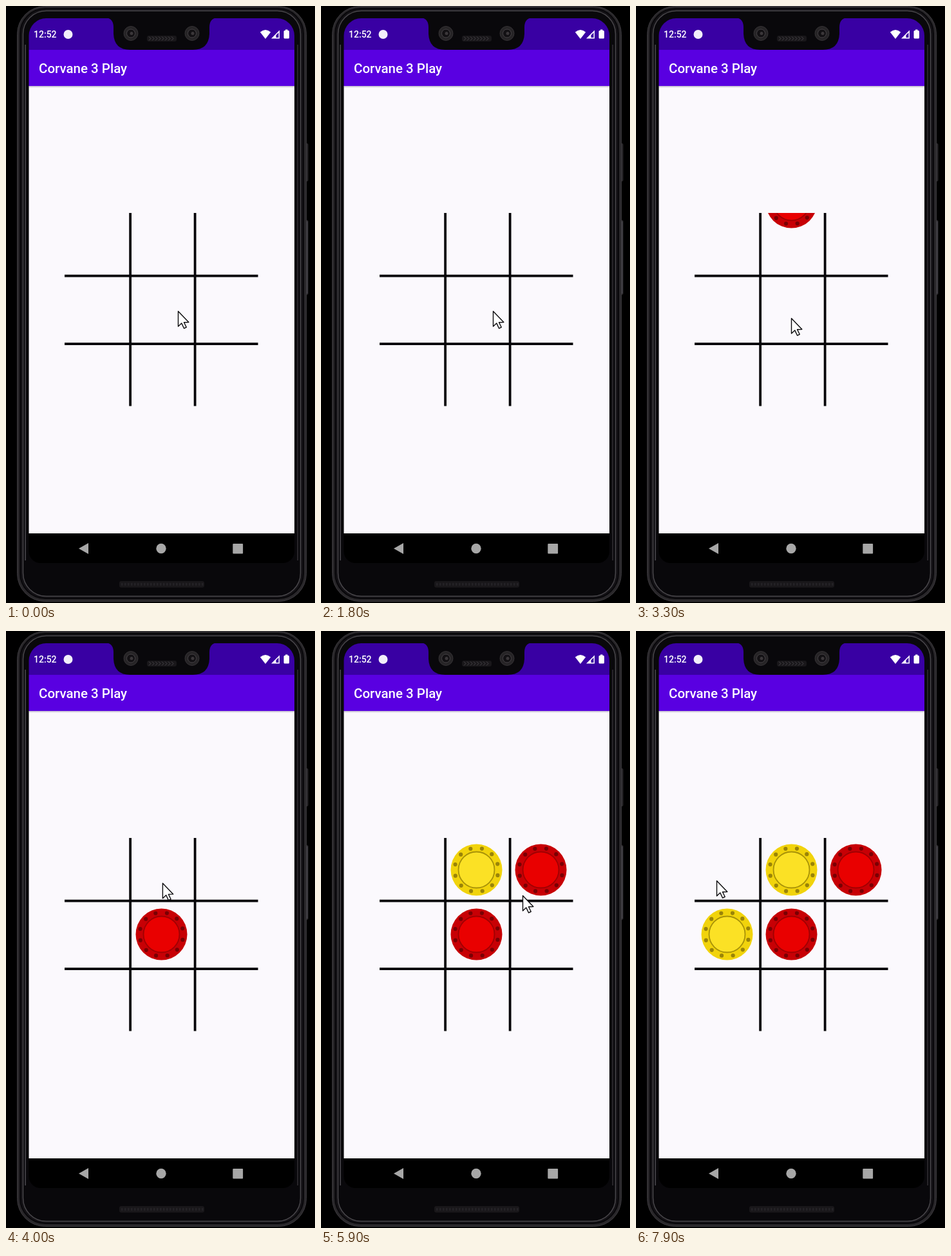
Animation, 480 px wide and 926 px high, one loop 8000 ms. Source, as an HTML page with a canvas:

```html
<!DOCTYPE html>
<html lang="en">
<head>
<meta charset="utf-8">
<title>Three in a row</title>
<style>
html, body { margin: 0; width: 100%; height: 100%; overflow: hidden; background: #000; }
canvas { display: block; width: 480px; height: 926px; }
</style>
</head>
<body>
<canvas id="stage" width="480" height="926"></canvas>
<script>
const ctx = document.getElementById('stage').getContext('2d');
const LOOP = 8000;
const FALL_MS = 300;
const FALL_PX = 430;

const RED = { rim: '#c70005', face: '#e90000', ring: '#a00002', dot: '#7a0003' };
const YELLOW = { rim: '#f1d30c', face: '#fbe125', ring: '#a89208', dot: '#9a8408' };

// Each chip: cell centre, colours, moment of the tap
const chips = [
  { x: 241.5, y: 470.5, skin: RED, at: 3129 },
  { x: 241.5, y: 370.5, skin: YELLOW, at: 4130 },
  { x: 341.5, y: 370.5, skin: RED, at: 5450 },
  { x: 141.5, y: 470.5, skin: YELLOW, at: 6829 }
];

// Pointer stops: time, x, y
const path = [
  [0, 267, 473], [1900, 267, 473], [2600, 243, 488], [3100, 241, 484],
  [3700, 241, 484], [4050, 243, 386], [4300, 245, 384], [4700, 305, 386],
  [5100, 320, 434], [5450, 313, 410], [5900, 313, 410], [6300, 190, 498],
  [6700, 141, 478], [7250, 141, 478], [7800, 125, 387], [8000, 125, 387]
];

const ease = p => 0.5 - Math.cos(Math.PI * p) / 2;

function rect(x, y, w, h, color) {
  ctx.fillStyle = color;
  ctx.fillRect(x, y, w, h);
}

function round(x, y, w, h, r, fill, line, width = 1) {
  ctx.beginPath();
  ctx.roundRect(x, y, w, h, r);
  if (fill) { ctx.fillStyle = fill; ctx.fill(); }
  if (line) { ctx.strokeStyle = line; ctx.lineWidth = width; ctx.stroke(); }
}

function disc(x, y, r, fill, line, width = 1) {
  ctx.beginPath();
  ctx.arc(x, y, r, 0, Math.PI * 2);
  if (fill) { ctx.fillStyle = fill; ctx.fill(); }
  if (line) { ctx.strokeStyle = line; ctx.lineWidth = width; ctx.stroke(); }
}

function poly(points, fill) {
  ctx.beginPath();
  points.forEach(([x, y]) => ctx.lineTo(x, y));
  ctx.closePath();
  ctx.fillStyle = fill;
  ctx.fill();
}

function text(str, x, y, size) {
  ctx.font = `500 ${size}px Roboto, sans-serif`;
  ctx.fillStyle = '#fff';
  ctx.fillText(str, x, y);
}

function body() {
  rect(0, 0, 480, 926, '#000');
  round(464, 213, 5.5, 59, 2, '#29272a');
  round(464, 332, 5.5, 116, 2, '#29272a');
  rect(467.5, 334, 1, 112, '#555358');
  round(17.5, 0.5, 449, 923, 43, '#29272a', '#3d3b3f');
  round(22, 4, 440, 915, 39, '#141216', '#08070a', 2);
  round(26.5, 7.5, 431, 908, 36, '#09080b', '#49474b', 1.5);
  rect(29.5, 60, 1.2, 800, '#5d5b60');
  rect(452.5, 60, 1.2, 800, '#3c3a3f');
  round(176, 892, 132, 10, 3, '#19171a');
  for (let x = 179; x < 306; x += 5) rect(x, 895, 2.5, 4, '#242226');
}

function notch() {
  const c = '#09080b';
  ctx.beginPath();
  ctx.moveTo(156, 18);
  ctx.quadraticCurveTo(167, 20, 167, 33);
  ctx.lineTo(167, 43);
  ctx.quadraticCurveTo(168, 68, 193, 68);
  ctx.lineTo(290, 68);
  ctx.quadraticCurveTo(315, 68, 316, 43);
  ctx.lineTo(316, 33);
  ctx.quadraticCurveTo(316, 20, 327, 18);
  ctx.closePath();
  ctx.fillStyle = c;
  ctx.fill();
  for (const x of [194, 289]) {
    disc(x, 42.5, 11, '#262426', '#353235');
    disc(x, 42.5, 6.5, '#121013', '#454145');
    disc(x + 1, 42.5, 2.5, '#3b373a');
  }
  round(219, 46, 46, 9, 3, '#19171a');
  ctx.strokeStyle = '#48454a';
  ctx.lineWidth = 1;
  for (let x = 222; x < 262; x += 5) {
    ctx.beginPath();
    ctx.moveTo(x, 47.5);
    ctx.lineTo(x + 3, 50.5);
    ctx.lineTo(x, 53.5);
    ctx.stroke();
  }
}

function statusIcons() {
  text('12:52', 43, 49, 14);
  disc(96.5, 44, 7, '#f2effa');
  ctx.beginPath();
  ctx.moveTo(403, 51);
  ctx.lineTo(394.8, 40.5);
  ctx.quadraticCurveTo(403, 33.5, 411.2, 40.5);
  ctx.closePath();
  ctx.fillStyle = '#fff';
  ctx.fill();
  poly([[412, 50.5], [425, 50.5], [425, 37.5]], '#fff');
  poly([[419.5, 49], [423.5, 49], [423.5, 41.2], [419.5, 45.2]], '#3900a3');
  round(431.5, 38, 8.5, 12.5, 1.5, '#fff');
  rect(434, 36.5, 3.5, 2, '#fff');
}

function screen() {
  ctx.save();
  ctx.beginPath();
  ctx.roundRect(35.5, 19, 412.5, 845, [27, 27, 18, 18]);
  ctx.clip();
  rect(35, 19, 414, 49, '#3900a3');
  rect(35, 68, 414, 56, '#5900e1');
  rect(35, 124, 414, 694, '#fbf9fd');
  const shade = ctx.createLinearGradient(0, 123, 0, 127);
  shade.addColorStop(0, 'rgba(60,40,100,.45)');
  shade.addColorStop(1, 'rgba(60,40,100,0)');
  rect(35, 124, 414, 3, shade);
  rect(35, 818, 414, 46, '#000');
  ctx.restore();
  notch();
  statusIcons();
  text('Corvane 3 Play', 51, 104, 20.5);
  const nav = '#a7a7a7';
  poly([[113, 841.5], [128, 833], [128, 850]], nav);
  disc(241, 841.5, 7.7, nav);
  round(352.3, 834, 15.8, 15.5, 1, nav);
}

function grid() {
  for (const x of [191.2, 291.7]) rect(x, 321, 3.8, 299.5, '#070609');
  for (const y of [416.7, 522.2]) rect(91, y, 300.5, 3.8, '#070609');
}

function chip(x, y, skin) {
  disc(x, y, 40, skin.rim);
  for (let i = 0; i < 12; i++) {
    const a = -1.32 + i * Math.PI / 6;
    disc(x + 34 * Math.cos(a), y + 34 * Math.sin(a), 3.1, skin.dot);
  }
  disc(x, y, 28, skin.face, skin.ring, 1.8);
}

function drawChips(t) {
  ctx.save();
  ctx.beginPath();
  ctx.rect(91, 321, 300.5, 299.5);
  ctx.clip();
  for (const c of chips) {
    if (t < c.at) continue;
    const p = Math.min(1, (t - c.at) / FALL_MS);
    chip(c.x, c.y - FALL_PX * (1 - ease(p)), c.skin);
  }
  ctx.restore();
}

function pointer(t) {
  const i = path.findIndex((s, k) => k > 0 && t <= s[0]);
  const [t0, x0, y0] = path[i - 1];
  const [t1, x1, y1] = path[i];
  const p = ease((t - t0) / (t1 - t0));
  ctx.save();
  ctx.translate(x0 + (x1 - x0) * p + 0.5, y0 + (y1 - y0) * p + 0.5);
  poly([[0, 0], [0, 23.5], [5.3, 18.6], [9, 26.5], [12.7, 24.8], [9, 17.2], [16.3, 17]], '#fff');
  ctx.strokeStyle = '#0b0a0d';
  ctx.lineWidth = 1.4;
  ctx.lineJoin = 'round';
  ctx.stroke();
  ctx.restore();
}

function frame(now) {
  const t = now % LOOP;
  body();
  screen();
  grid();
  drawChips(t);
  pointer(t);
  requestAnimationFrame(frame);
}

requestAnimationFrame(frame);
</script>
</body>
</html>
```
